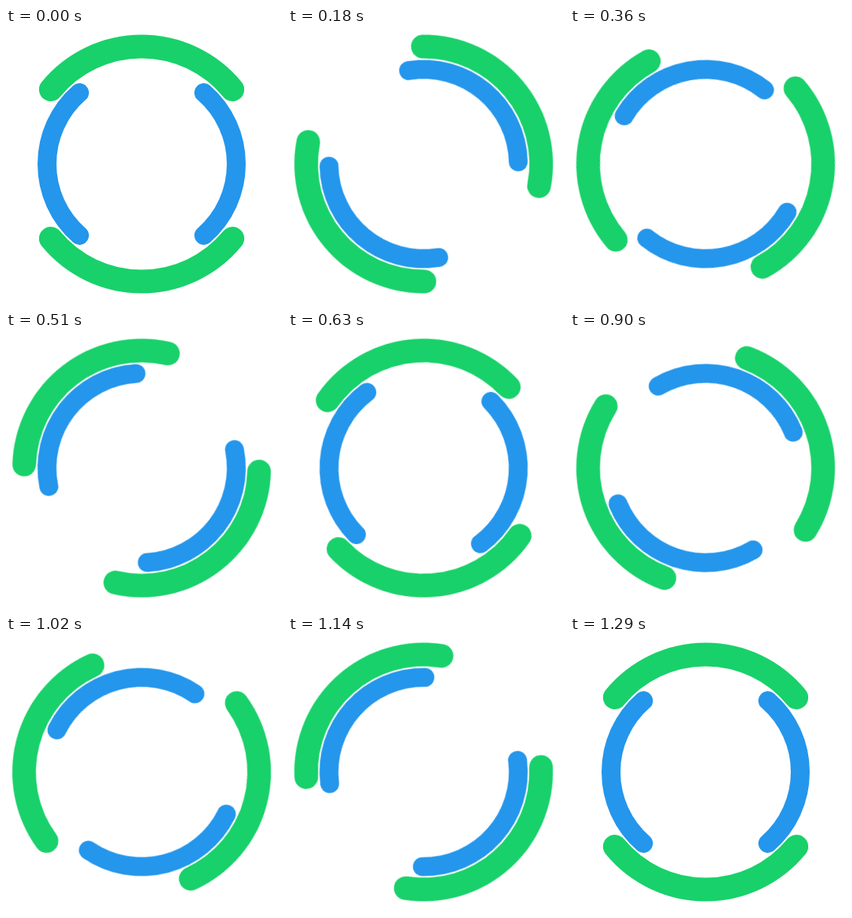
An HTML page without scripts that plays this animation: 350x350 px, repeating every 1.32 s.

```html
<!DOCTYPE html>
<html lang="en">
<head>
<meta charset="utf-8">
<title>Double ring loader</title>
<style>
  html, body { margin: 0; width: 100%; height: 100%; overflow: hidden; background: #fff; }
  svg { display: block; width: 350px; height: 350px; }

  circle {
    fill: none;
    stroke-linecap: round;
    transform-origin: 172px 172.5px;
    /* 44 poses, first and last alike */
    animation: turn 1320ms steps(44, jump-none) -1ms infinite;
  }
  .outer {
    stroke: #18d16a;
    stroke-width: 30px;
    stroke-dasharray: 101.2 78.8;
    stroke-dashoffset: -39.4;
  }
  .inner {
    stroke: #2496ec;
    stroke-width: 24px;
    stroke-dasharray: 97.8 82.2;
    stroke-dashoffset: 48.9;
    animation-direction: reverse;
  }
  @keyframes turn {
    from { transform: rotate(0deg); }
    to { transform: rotate(360deg); }
  }
</style>
</head>
<body>
<svg viewBox="0 0 350 350">
  <circle class="outer" cx="172" cy="172.5" r="149" pathLength="360"/>
  <circle class="inner" cx="172" cy="172.5" r="120" pathLength="360"/>
</svg>
</body>
</html>
```
